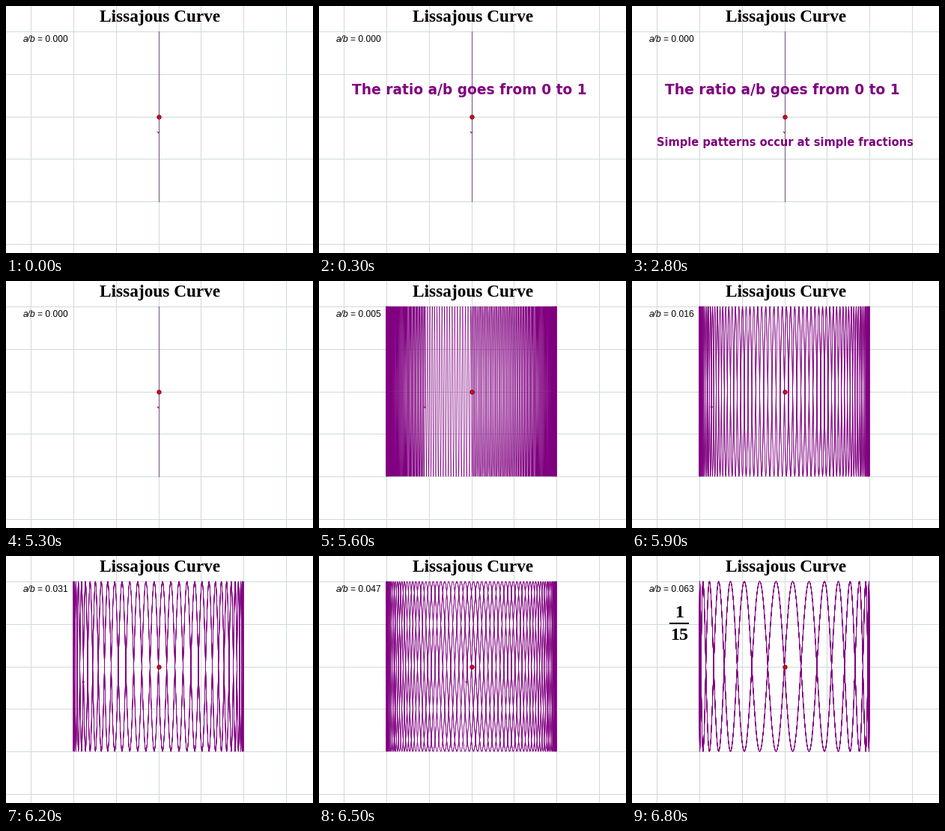
These frames come from a looping animation (410 px wide and 330 px high, 8 s). A matplotlib script:

```python
import math

import matplotlib as mpl
import matplotlib.pyplot as plt
import numpy as np
from matplotlib.animation import FuncAnimation
from matplotlib.collections import LineCollection

W, H, DPI = 410, 330, 72
CX, CY, UNIT = 203.5, 147.5, 56.75
AMP = 2 * UNIT
TURN = 2 * math.pi
T_END = 181 * TURN + 3.33  # phase of b where the trace stops
STEP, LOOP = 100, 8000

PURPLE = "#800080"
GRID = "#d0dad6"

# start in ms, a, b, number of message lines, fraction shown
STAGES = [
    (0, 0, 1, 0, False),
    (300, 0, 1, 1, False),
    (2800, 0, 1, 2, False),
    (5300, 0, 1, 0, False),
    (5600, 1, 200, 0, False),
    (5900, 1, 64, 0, False),
    (6200, 1, 32, 0, False),
    (6500, 3, 64, 0, False),
    (6800, 1, 16, 0, True),
]

mpl.rcParams["toolbar"] = "None"

fig = plt.figure(figsize=(W / DPI, H / DPI), dpi=DPI, facecolor="white")
ax = fig.add_axes([0, 0, 1, 1])
ax.set_xlim(0, W)
ax.set_ylim(H, 0)
ax.axis("off")


def label(x, y, s, size, font, color="black", ha="center", **kw):
    return ax.text(x, y, s, fontsize=size, family=font, color=color,
                   ha=ha, va="baseline", zorder=6, **kw)


def locate(ratio, phase):
    return CX + AMP * np.sin(ratio * phase), CY - AMP * np.sin(phase)


def trace(ratio):
    """The whole trace, one stroke per turn of b, so retraced lines thicken."""
    end = T_END if ratio else TURN
    return [np.column_stack(locate(ratio, np.linspace(s, min(s + TURN, end), 72)))
            for s in np.arange(0, end, TURN)]


for k in range(-3, 4):
    ax.axvline(CX + k * UNIT, color=GRID, lw=1, zorder=1)
    ax.axhline(CY + k * UNIT, color=GRID, lw=1, zorder=1)

curve = ax.add_collection(
    LineCollection([], joinstyle="round", zorder=3), autolim=False)
arrow, = ax.plot([], [], color="#8c1660", lw=1, zorder=4)
ax.plot([CX], [CY], "o", ms=5.4, mfc="#d00a1c", mec="#7a0a20",
        mew=0.9, zorder=5)

label(205.3, 21, "Lissajous Curve", 23.3, "Liberation Serif", weight="bold")
label(22.4, 48.5, "a/b", 12, "Liberation Sans", ha="left", style="italic")
value = label(42, 48.5, "", 12, "Liberation Sans", ha="left")

messages = [
    label(201, 118, "The ratio a/b goes from 0 to 1", 18.6, "DejaVu Sans",
          PURPLE, weight="bold"),
    label(204.5, 187, "Simple patterns occur at simple fractions", 14.6,
          "DejaVu Sans", PURPLE, weight="bold"),
]
fraction = [
    label(63, 82, "1", 24, "Liberation Serif", weight="bold"),
    label(63, 112, "15", 24, "Liberation Serif", weight="bold"),
    ax.plot([50, 76], [90, 90], color="black", lw=2,
            solid_capstyle="butt", zorder=6)[0],
]


def update(i):
    _, a, b, lines, show = [s for s in STAGES if s[0] <= i * STEP][-1]
    ratio = a / b
    curve.set_segments(trace(ratio))
    curve.set_color(PURPLE if a else "#6e5072")
    curve.set_linewidth(0.6 if a else 1)
    x, y = locate(ratio, T_END)
    arrow.set_data([x - 1.3, x, x + 1.3], [y - 0.8, y + 1, y - 0.8])
    value.set_text(f"= {math.floor(ratio * 1000 + 0.5) / 1000:.3f}")
    for k, msg in enumerate(messages):
        msg.set_visible(k < lines)
    for part in fraction:
        part.set_visible(show)
    return [curve, arrow, value, *messages, *fraction]


anim = FuncAnimation(fig, update, frames=LOOP // STEP, interval=STEP,
                     repeat=True, repeat_delay=0, blit=False)
plt.show()
```
